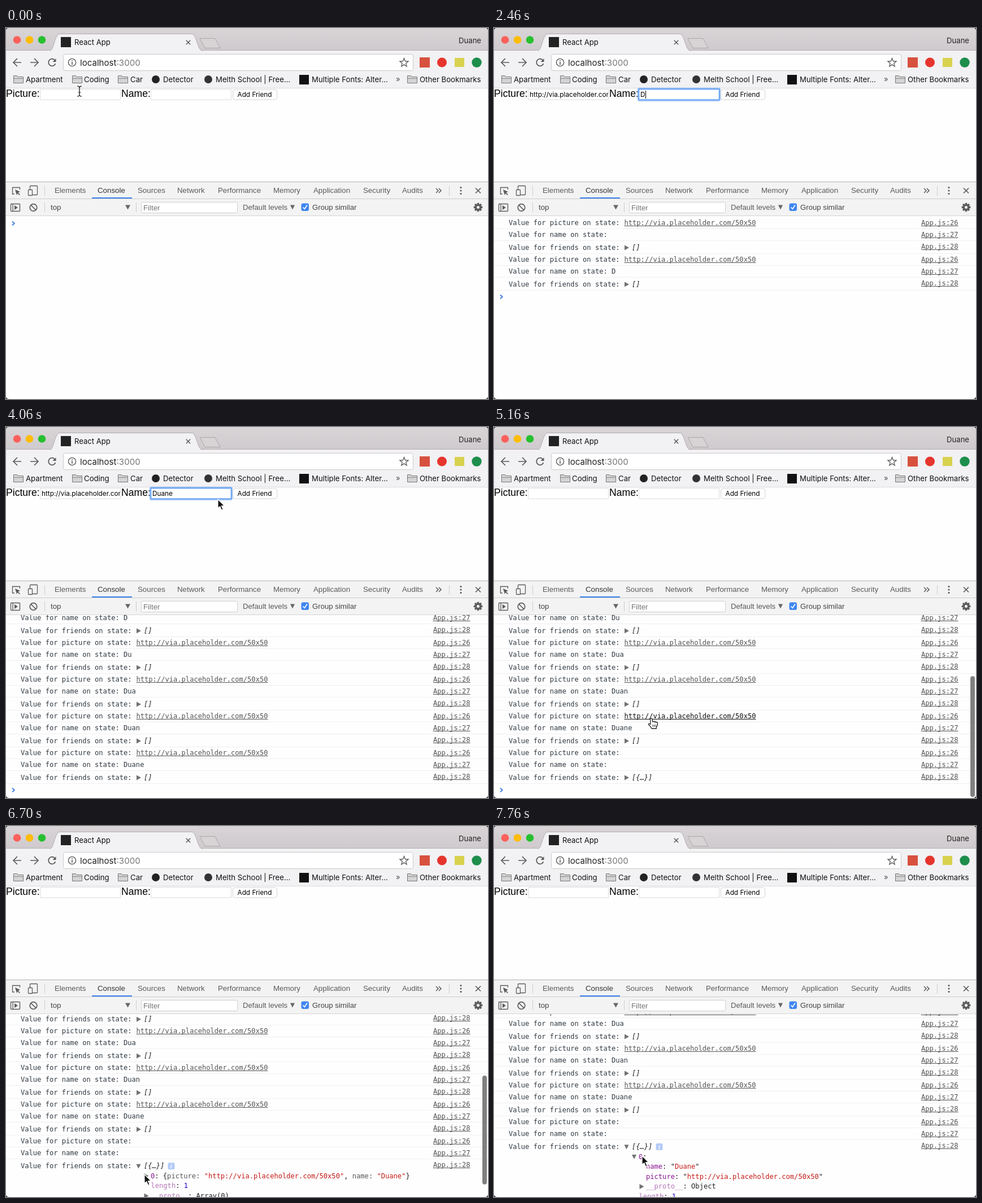
Recreate the animation shown at these times as an HTML page with a canvas. Size 853x657 px, loop 8 s.

```html
<!DOCTYPE html>
<html lang="en">
<head>
<meta charset="utf-8">
<title>React App</title>
<style>
html, body { margin: 0; width: 853px; height: 657px; overflow: hidden; background: #fff; }
canvas { display: block; }
</style>
</head>
<body>
<canvas id="stage" width="853" height="657"></canvas>
<script>
const ctx = document.getElementById('stage').getContext('2d');
const W = 853, H = 657, LOOP = 8000;
const ui = size => `${size}px Inter, sans-serif`;
const sans = size => `${size}px "Liberation Sans", Arial, sans-serif`;
const MONO = '12.1px "DejaVu Sans Mono", monospace';
const INPUT = ui(11.8);
const NAME = 'Duane', URL_TEXT = 'http://via.placeholder.com/50x50';

// Timeline
const PASTE = 1000, KEYS = [2460, 2760, 2870, 2990, 3100];
const PRESS = 4430, RELEASE = 4550, OPEN_LIST = 5760, OPEN_ITEM = 7450;
const GROUP = 65, TOP = 335, VIEW = 324, TREE_LINE = 17.6, TREE = 53;
const logs = [
  { at: PASTE, picture: URL_TEXT, name: '' },
  ...KEYS.map((at, i) => ({ at, picture: URL_TEXT, name: NAME.slice(0, i + 1) })),
  { at: RELEASE, picture: '', name: '', last: true },
];
const focusSpans = [
  { from: 300, to: 1570, box: 60, resets: [330, PASTE] },
  { from: 1570, to: PRESS, box: 256, resets: [1600, ...KEYS] },
];
const barSpans = [[2990, 3600], [RELEASE, 5180], [6630, 7330]];
const cursorPath = [
  [0, 130, 112], [30, 130, 112], [130, 130, 118], [3600, 130, 118], [3830, 255, 122],
  [4060, 375, 128], [4400, 432, 113], [4930, 432, 113], [5160, 278, 516],
  [5450, 255, 585], [5730, 237, 618], [5800, 237, 618], [6100, 245, 617],
  [7130, 245, 617], [7400, 247, 584], [7520, 247, 584], [7760, 262, 584], [8000, 262, 584],
];

const clamp = v => Math.max(0, Math.min(1, v));
const smooth = p => p * p * (3 - 2 * p);

// Drawing helpers
function text(str, x, y, font, color = '#111', align = 'left') {
  ctx.font = font;
  ctx.fillStyle = color;
  ctx.textAlign = align;
  ctx.fillText(str, x, y);
  return x + ctx.measureText(str).width;
}
function rect(x, y, w, h, color) {
  ctx.fillStyle = color;
  ctx.fillRect(x, y, w, h);
}
function paint(fill, stroke, width = 1) {
  if (fill) { ctx.fillStyle = fill; ctx.fill(); }
  if (stroke) { ctx.strokeStyle = stroke; ctx.lineWidth = width; ctx.stroke(); }
}
function box(x, y, w, h, r, fill, stroke, width) {
  ctx.beginPath();
  ctx.roundRect(x, y, w, h, r);
  paint(fill, stroke, width);
}
function disc(x, y, r, fill, stroke, width) {
  ctx.beginPath();
  ctx.arc(x, y, r, 0, Math.PI * 2);
  paint(fill, stroke, width);
}
function poly(points, fill, stroke, width, open) {
  ctx.beginPath();
  points.forEach(([x, y]) => ctx.lineTo(x, y));
  if (!open) ctx.closePath();
  paint(fill, stroke, width);
}
const line = (points, color, width) => poly(points, null, color, width, true);
const triRight = (x, y) => poly([[x, y - 4.5], [x + 8, y], [x, y + 4.5]], '#727272');
const triDown = (x, y, w = 8, color = '#727272') =>
  poly([[x, y - 3.5], [x + w, y - 3.5], [x + w / 2, y + 4.5]], color);
function cross(x, y, r, color, width) {
  line([[x - r, y - r], [x + r, y + r]], color, width);
  line([[x + r, y - r], [x - r, y + r]], color, width);
}
function folder(x) {
  poly([[x + .5, 97.5], [x + .5, 84.5], [x + 6.5, 84.5], [x + 8, 86.5], [x + 17.5, 86.5], [x + 17.5, 97.5]],
    '#d4d4d4', '#777');
  line([[x + 1, 89.5], [x + 17, 89.5]], '#8a8a8a', 1);
}

// Browser frame
function titleBar() {
  const shade = ctx.createLinearGradient(0, 0, 0, 40);
  shade.addColorStop(0, '#d9d4d6');
  shade.addColorStop(1, '#cfcacd');
  rect(0, 0, W, 40, shade);
  rect(0, 40, W, 66, '#f2f1f3');
  rect(0, 39, W, 1, '#b3afb1');
  ctx.beginPath();
  ctx.moveTo(78, 40.5);
  ctx.bezierCurveTo(85, 39, 86, 11, 95, 10.5);
  ctx.lineTo(329, 10.5);
  ctx.bezierCurveTo(337, 11, 339, 39, 347, 40.5);
  paint('#f2f1f3', '#b0acae');
  rect(79, 40, 267, 2, '#f2f1f3');
  ['#fc605b', '#fdbc06', '#25c02f'].forEach((c, i) => disc(19.5 + 22 * i, 21, 6.8, c));
  rect(97, 16, 18, 18, '#222');
  text('React App', 121, 30, ui(13.1));
  cross(322.5, 25.5, 3.7, '#555', 1.4);
  poly([[343, 18.5], [370, 18.5], [379, 35.5], [352, 35.5]], '#d8d4d6', '#aaa6a8');
  text(NAME, 841, 27, ui(13.1), '#222', 'right');
}
function toolbar() {
  const ink = '#5a5a5a';
  line([[27, 61], [13, 61]], ink, 1.7);
  line([[20, 54], [13, 61], [20, 68]], ink, 1.7);
  line([[43, 61], [57, 61]], ink, 1.7);
  line([[50, 54], [57, 61], [50, 68]], ink, 1.7);
  ctx.beginPath();
  ctx.arc(81.5, 61, 6.3, .35, 5.5);
  paint(null, ink, 1.8);
  poly([[88.5, 54], [88.5, 60], [82.5, 60]], ink);
  box(101.5, 46.5, 619, 29, 3, '#fff', '#cbcacb');
  disc(117, 61, 6.6, null, ink, 1.4);
  rect(116.2, 60, 1.6, 5, ink);
  rect(116.2, 57, 1.6, 1.7, ink);
  const end = text('localhost', 131, 66.5, ui(15.1), '#222');
  text(':3000', end, 66.5, ui(15.1), '#777');
  const star = Array.from({ length: 10 }, (_, i) => {
    const a = -Math.PI / 2 + i * Math.PI / 5, r = i % 2 ? 3.4 : 8;
    return [704.5 + r * Math.cos(a), 61.5 + r * Math.sin(a)];
  });
  poly(star, null, ink, 1.3);
  rect(732, 52, 18, 18, '#d8513f');
  disc(771.5, 61, 8.5, '#e5352d');
  rect(794, 53, 17, 16, '#d9d24f');
  disc(833, 61, 8.7, '#1e8e4c');
}
function bookmarks() {
  const label = (str, x) => text(str, x, 96, ui(13.2));
  [13, 117, 198, 710].forEach(folder);
  label('Apartment', 35);
  label('Coding', 138);
  label('Car', 220);
  disc(265, 91, 7, '#222');
  label('Detector', 278);
  disc(358, 91, 7, '#333');
  label('Melth School | Free...', 371);
  rect(519, 83, 17, 17, '#111');
  label('Multiple Fonts: Alter...', 541);
  text('»', 690, 95, ui(13), '#555');
  label('Other Bookmarks', 732);
  rect(0, 106, W, 1, '#dcdbdc');
}

// Page form
function input(x, value, focus, t) {
  box(x + .5, 108.5, 142, 18.5, 0, '#fff', '#dcdcdc');
  if (focus) {
    box(x - .5, 107.5, 144, 20.5, 2, null, 'rgba(100,160,250,.4)', 4.5);
    box(x, 108, 143, 19.5, 1, null, '#6ba4f3', 2);
  }
  ctx.save();
  ctx.beginPath();
  ctx.rect(x + 2, 109, 140, 18);
  ctx.clip();
  ctx.font = INPUT;
  const shift = focus ? Math.max(0, ctx.measureText(value).width - 136) : 0;
  const end = text(value, x + 3 - shift, 122, INPUT, '#000');
  if (focus) {
    const since = t - Math.max(focus.from, ...focus.resets.filter(r => r <= t));
    if (since % 1000 < 500) rect(Math.round(end), 111, 1, 14, '#000');
  }
  ctx.restore();
}
function form(t) {
  const focus = focusSpans.find(f => t >= f.from && t < f.to);
  const filled = t < RELEASE;
  const typed = filled ? NAME.slice(0, KEYS.filter(k => k <= t).length) : '';
  text('Picture:', 0, 122, sans(17.6), '#000');
  text('Name:', 204, 122, sans(17.6), '#000');
  input(60, filled && t >= PASTE ? URL_TEXT : '', focus && focus.box === 60 && focus, t);
  input(256, typed, focus && focus.box === 256 && focus, t);
  const down = t >= PRESS && t < RELEASE;
  box(401.5, 109, 78, 18, 4, down ? '#3f8ef5' : '#fff', down ? '#2f78dc' : '#d2d2d2');
  text('Add Friend', 440, 122, ui(11.8), down ? '#fff' : '#000', 'center');
}

// Developer tools
function devtools() {
  const ink = '#5c5c5c';
  rect(0, 272, W, 61, '#f3f3f3');
  [[272, '#b3b3b3'], [302, '#cdcdcd'], [332, '#d5d5d5']].forEach(([y, c]) => rect(0, y, W, 1, c));
  const tabs = { Elements: 86, Console: 162, Sources: 233, Network: 303, Performance: 375,
    Memory: 473, Application: 544, Security: 632, Audits: 701 };
  for (const [name, x] of Object.entries(tabs))
    text(name, x, 292, sans(13.3), name === 'Console' ? '#333' : '#5a5a5a');
  rect(152, 300, 71, 2, '#3b82f0');
  line([[15, 294], [11.5, 294], [11.5, 282.5], [24.5, 282.5], [24.5, 286]], ink, 1.3);
  poly([[16, 286], [25, 290], [21.5, 291.5], [25, 295], [23.5, 296], [20.5, 293], [19, 296]], ink);
  box(42.5, 279.5, 13, 16, 1, null, ink, 1.3);
  box(39.5, 286.5, 7, 10, 1, '#f3f3f3', ink, 1.3);
  [[68, 280], [784, 280], [68, 309], [230, 309]].forEach(([x, y]) => rect(x, y, 1, 17, '#ccc'));
  [761, 766].forEach(x => line([[x, 284], [x + 4, 288], [x, 292]], ink, 1.5));
  [282.5, 288, 293.5].forEach(y => disc(805, y, 1.6, ink));
  cross(835.5, 288, 4.5, ink, 1.7);

  box(8.5, 311.5, 16, 13, 1, null, ink, 1.4);
  rect(11.5, 312, 1.3, 12, ink);
  poly([[15, 314], [21, 318], [15, 322]], ink);
  disc(48.5, 318, 6.3, null, ink, 1.7);
  line([[44, 313.5], [53, 322.5]], ink, 1.7);
  text('top', 79, 322, sans(13.3), '#444');
  triDown(211, 317, 9, '#666');
  box(239.5, 308.5, 170, 19, 2, '#fff', '#cfcfcf');
  text('Filter', 243, 323, sans(13.3), '#757575');
  text('Default levels', 419, 322, sans(13.2), '#5a5a5a');
  triDown(503, 317, 8, '#666');
  box(522.5, 310.5, 13.5, 13.5, 3, '#3f86f2');
  line([[525.5, 317.5], [528.3, 320.5], [533, 313.5]], '#fff', 1.7);
  text('Group similar', 542, 322, sans(13.2), '#444');
  for (let i = 0; i < 8; i++) {
    const a = i * Math.PI / 4, dx = Math.cos(a), dy = Math.sin(a);
    line([[835.5 + 4 * dx, 317.5 + 4 * dy], [835.5 + 7.8 * dx, 317.5 + 7.8 * dy]], ink, 3.4);
  }
  disc(835.5, 317.5, 4.2, null, ink, 3.4);
}

const mono = (str, x, y, color = '#303942', style = '') => text(str, x, y + 4, style + MONO, color);
function link(str, x, y, color) {
  const end = mono(str, x, y, color);
  rect(x, Math.round(y + 5), end - x, 1, color);
}
const runs = (x, y, parts) => parts.reduce((at, [str, color]) => mono(str, at, y, color), x);
const KEY = '#881391', DIM = '#b477ba', STR = '#c41a16', NUM = '#1c00cf', INK = '#222';

function tree(y, itemOpen) {
  let row = y + TREE_LINE;
  const next = () => (row += TREE_LINE);
  if (itemOpen) {
    triDown(244, row);
    runs(256, row, [['0', KEY], [':', INK]]);
    runs(269, next(), [['name', KEY], [': "', INK], [NAME, STR], ['"', INK]]);
    runs(269, next(), [['picture', KEY], [': "', INK], [URL_TEXT, STR], ['"', INK]]);
    triRight(257.5, next());
    runs(269, row, [['__proto__', DIM], [': Object', INK]]);
  } else {
    triRight(244.5, row);
    runs(256, row, [['0', KEY], [': {', INK], ['picture: ', '#565656'], [`"${URL_TEXT}"`, STR],
      [', ', INK], ['name: ', '#565656'], [`"${NAME}"`, STR], ['}', INK]]);
  }
  runs(256.5, next(), [['length', DIM], [': ', INK], ['1', NUM]]);
  triRight(244.5, next());
  runs(256.5, row, [['__proto__', DIM], [': Array(0)', INK]]);
}

function consoleRows(t, cursor) {
  const shown = logs.filter(l => l.at <= t);
  const extra = (t >= OPEN_LIST ? TREE : 0) + (t >= OPEN_ITEM ? TREE : 0);
  const scroll = Math.max(0, GROUP * shown.length - 297) + TREE * clamp((t - 6630) / 200);
  let hover = false;
  ctx.save();
  ctx.beginPath();
  ctx.rect(0, 333, W, VIEW);
  ctx.clip();
  shown.forEach((log, i) => {
    const y = TOP + GROUP * i - scroll;
    mono('Value for picture on state: ', 26, y + 10);
    if (log.picture) {
      const over = cursor && cursor.x > 231 && cursor.x < 464 && cursor.y > 333 && Math.abs(cursor.y - y - 10) < 8;
      hover = hover || over;
      link(log.picture, 230.5, y + 10, over ? '#111' : '#545454');
    }
    mono('Value for name on state: ' + log.name, 26, y + 31);
    mono('Value for friends on state: ', 26, y + 54);
    const open = log.last && t >= OPEN_LIST;
    if (open) triDown(230.5, y + 54); else triRight(231, y + 54);
    mono(log.last ? '[{…}]' : '[]', 244, y + 54, INK, 'italic ');
    if (open) {
      box(286.5, y + 48, 12, 12, 2.5, '#b5cbfa');
      text('i', 292.5, y + 58, 'italic bold 10px "Liberation Serif", serif', '#fff', 'center');
      tree(y + 54, t >= OPEN_ITEM);
    }
    [10, 31, 52].forEach((dy, k) => link('App.js:' + (26 + k), 756, y + dy, '#545454'));
    [20, 41, 64 + (open ? extra : 0)].forEach(dy => rect(0, Math.round(y + dy), W, 1, '#f0f0f0'));
  });
  const py = TOP + GROUP * shown.length + 11 + extra - scroll;
  line([[11, py - 3.5], [15, py], [11, py + 3.5]], '#3a7be0', 1.7);

  const span = barSpans.find(([from, to]) => t >= from && t < to + 250);
  if (span) {
    const content = GROUP * shown.length + 27 + extra;
    ctx.globalAlpha = 1 - clamp((t - span[1]) / 250);
    box(843, 337 + 318 * scroll / content, 8, 318 * VIEW / content, 4, '#808080');
  }
  ctx.restore();
  return hover;
}

// Pointer
function cursorAt(t) {
  if (t >= PASTE && t < 3600) return null;
  const i = cursorPath.findIndex(k => k[0] > t);
  const [t0, x0, y0] = cursorPath[i - 1], [t1, x1, y1] = cursorPath[i];
  const linear = t > 3600 && t < 4060;
  const raw = (t - t0) / (t1 - t0), p = linear ? raw : smooth(raw);
  return { x: x0 + (x1 - x0) * p, y: y0 + (y1 - y0) * p };
}
function drawCursor({ x, y }, hand) {
  ctx.save();
  ctx.translate(x, y);
  ctx.lineJoin = 'round';
  if (hand) {
    ctx.beginPath();
    ctx.moveTo(-1, 9);
    ctx.lineTo(-1.5, 1);
    ctx.quadraticCurveTo(.3, -1.2, 2, 1);
    ctx.lineTo(2.6, 6);
    [5.6, 8.6, 11.4].forEach((kx, i) => ctx.quadraticCurveTo(kx - 1.5, 4 + i * .6, kx, 6.6 + i * .6));
    ctx.quadraticCurveTo(12, 12, 9.5, 15);
    ctx.lineTo(9.3, 18);
    ctx.lineTo(1, 18);
    ctx.quadraticCurveTo(-1, 14, -4.5, 11);
    ctx.quadraticCurveTo(-5, 8, -1, 10.5);
    ctx.closePath();
    paint('#fff', '#222', 1.3);
    [3, 5.5, 8].forEach(kx => line([[kx, 11], [kx, 15]], '#333', 1));
  } else if (y < 127 && y > 107 && x < 400) {
    const stem = [[0, -7.5], [0, 7.5]];
    line(stem, '#333', 1.5);
    [-1, 1].forEach(s => {
      ctx.beginPath();
      ctx.moveTo(-3.7, 9 * s);
      ctx.quadraticCurveTo(-.3, 9 * s, 0, 6.5 * s);
      ctx.quadraticCurveTo(.3, 9 * s, 3.7, 9 * s);
      paint(null, '#333', 1.3);
    });
    line([[-2.5, 2], [2.5, 2]], '#333', 1.2);
  } else {
    poly([[0, 0], [0, 16], [3.7, 12.6], [6.4, 19], [9.2, 17.8], [6.5, 11.7], [11.5, 11.7]], '#111', '#fff', 1.2);
  }
  ctx.restore();
}

function draw(t) {
  rect(0, 0, W, H, '#3b3838');
  ctx.save();
  ctx.beginPath();
  ctx.roundRect(0, 0, W, H, 5);
  ctx.clip();
  rect(0, 0, W, H, '#fefefe');
  titleBar();
  toolbar();
  bookmarks();
  form(t);
  devtools();
  const cursor = cursorAt(t);
  const hover = consoleRows(t, cursor);
  if (cursor) drawCursor(cursor, hover);
  ctx.restore();
}

const start = performance.now();
function tick() {
  draw((performance.now() - start) % LOOP);
  requestAnimationFrame(tick);
}
tick();
</script>
</body>
</html>
```
